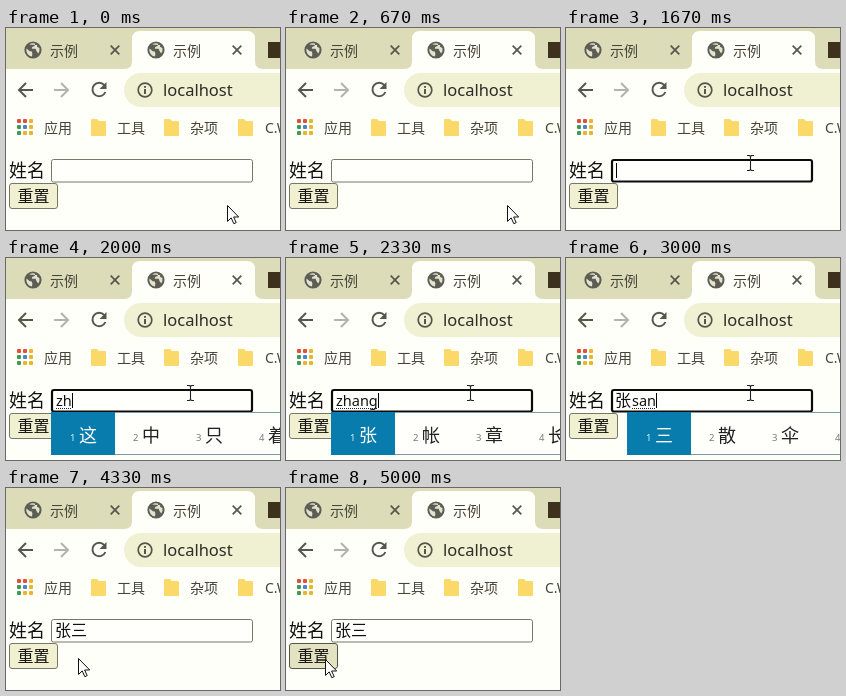
An HTML page that plays this animation: 274x202 px, repeating every 5330 ms.

```html
<!DOCTYPE html>
<html lang="zh-CN">
<head>
<meta charset="utf-8">
<title>示例</title>
<style>
html, body { margin: 0; width: 100%; height: 100%; overflow: hidden; background: #fffff9; }
svg { display: block; width: 274px; height: 202px; }
text { font-family: "Noto Sans CJK SC", "Noto Sans CJK", sans-serif; white-space: pre; }
.latin { font-family: "Noto Sans", "Open Sans", sans-serif; }
.ui { font-size: 14px; fill: #45453a; }
.line { fill: none; stroke: #55564c; stroke-width: 2; }
</style>
</head>
<body>
<svg viewBox="0 0 274 202">
  <defs>
    <g id="globe">
      <circle r="8.6" fill="#5c5e56"/>
      <path d="M-6.6-1.5L-3.2 1.2L-1.2 1.4L-.6 3.4L-1 6.6A6.8 6.8 0 0 1-6.6-1.5ZM-3.8-5.4A6.8 6.8 0 0 1 2.2-6.3L1.6-4L-.8-3L-1.2-1.2H2.6L3.6 1.2L5.2 3.6A6.8 6.8 0 0 0 6.4-2L4-3.2L4.2-5" fill="#e4e4cc"/>
    </g>
    <path id="close" class="line" d="M-4.3-4.3L4.3 4.3M4.3-4.3L-4.3 4.3" style="stroke-width:1.7"/>
    <path id="folder" d="M1 0H6L8 2H14Q15 2 15 3V16Q15 17 14 17H1Q0 17 0 16V1Q0 0 1 0Z" fill="#fbd969"/>
    <path id="back" class="line" d="M15 0H1.5M8-7L1 0L8 7"/>
  </defs>

  <rect width="274" height="202" fill="#fffff9"/>
  <rect width="274" height="41" fill="#dcdcb8"/>
  <path d="M118 41Q126 41 126 33V11Q126 3 134 3H241Q249 3 249 11V33Q249 41 257 41Z" fill="#fffff9"/>
  <use href="#globe" x="27" y="22"/>
  <use href="#globe" x="150" y="22"/>
  <text class="ui" x="44" y="27.5">示例</text>
  <text class="ui" x="167" y="27.5">示例</text>
  <use href="#close" x="109" y="22"/>
  <use href="#close" x="231" y="22"/>
  <rect x="262" y="14" width="16" height="16" fill="#3d301d"/>

  <use href="#back" x="12" y="62"/>
  <use href="#back" transform="translate(63 62) scale(-1 1)" opacity=".45"/>
  <path class="line" d="M98.3 57.2A6.7 6.7 0 1 0 99.4 64"/>
  <path d="M100.5 54V61H93.5Z" fill="#55564c"/>
  <rect x="118" y="45" width="190" height="34" rx="17" fill="#f0f0d3"/>
  <circle class="line" cx="139" cy="62" r="6.8" style="stroke-width:1.7"/>
  <path class="line" d="M139 61V66M139 58V59.8"/>
  <text class="latin" x="157" y="68" font-size="16.5" fill="#2c2c28">localhost</text>

  <g id="dots"></g>
  <text class="ui" x="38" y="105">应用</text>
  <use href="#folder" x="85" y="91"/>
  <text class="ui" x="111" y="105">工具</text>
  <use href="#folder" x="158" y="91"/>
  <text class="ui" x="184" y="105">杂项</text>
  <use href="#folder" x="232" y="91"/>
  <text class="ui latin" x="259" y="104.5">C.W</text>

  <text x="3" y="148.5" font-size="18" fill="#111">姓名</text>
  <rect id="field" fill="#fffffb"/>
  <text id="value" y="148" fill="#111"></text>
  <path id="under" stroke="#222" stroke-dasharray="1 1"/>
  <rect id="caret" y="135" width="1" height="15" fill="#000"/>
  <rect id="button" x="3.5" y="155.5" width="48" height="25" rx="2.5" stroke="#77776a"/>
  <text x="11.5" y="174" font-size="16" fill="#111">重置</text>

  <g id="popup">
    <rect x=".5" y="154.5" width="300" height="42" fill="#fffffb" stroke="#7f9aa2"/>
    <rect y="154" width="64" height="43" fill="#087cad"/>
    <g id="words"></g>
  </g>

  <path id="arrow" d="M.5.5V16.4L4.2 12.9L6.8 18.7L9.2 17.6L6.6 12H11.7Z" fill="#fff" stroke="#111"/>
  <path id="beam" d="M-3.5-7.5H-1L0-6.5L1-7.5H3.5M0-6.5V6.5M-3.5 7.5H-1L0 6.5L1 7.5H3.5" fill="none" stroke="#222" stroke-width="1.1"/>
</svg>
<script>
const LOOP = 5330;
const $ = id => document.getElementById(id);
const set = (el, attrs) => {
  for (const k in attrs) el.setAttribute(k, attrs[k]);
  return el;
};
const add = (parent, tag, attrs) =>
  parent.appendChild(set(document.createElementNS("http://www.w3.org/2000/svg", tag), attrs));
const show = (el, on) => { el.style.display = on ? "" : "none"; };

// Each step overrides the state reached so far.
const steps = [
  { at: 0, x: 221, y: 177, beam: false, focus: false, done: "", typing: "", list: "", hover: false },
  { at: 1000, x: 203, y: 165 },
  { at: 1330, x: 184.5, y: 135, beam: true },
  { at: 1670, focus: true },
  { at: 2000, typing: "zh", list: "这中只着" },
  { at: 2330, typing: "zhang", list: "张帐章长" },
  { at: 2670, done: "张", typing: "", list: "" },
  { at: 3000, typing: "san", list: "三散伞叁" },
  { at: 3330, done: "张三", typing: "", list: "" },
  { at: 3670, x: 110, y: 155, beam: false },
  { at: 4000, x: 76, y: 167, focus: false },
  { at: 4330, x: 72, y: 170 },
  { at: 4670, x: 39, y: 171, hover: true }
];

const dotColors = ["#e2503b", "#e2503b", "#e8b52c", "#3f9a58", "#4a83c9", "#e8b52c", "#3f9a58", "#e8b52c", "#e8b52c"];
dotColors.forEach((fill, i) =>
  add($("dots"), "rect", { x: 11 + i % 3 * 6, y: 91 + Math.floor(i / 3) * 6, width: 4, height: 4, rx: 1, fill }));

function drawList(list, left) {
  show($("popup"), list);
  if (!list) return;
  set($("popup"), { transform: `translate(${left} 0)` });
  $("words").replaceChildren();
  [...list].forEach((word, i) => {
    const x = 19 + i * 63;
    add($("words"), "text", { class: "latin", x, y: 183, "font-size": 9.5, fill: i ? "#777" : "#dceef4" }).textContent = i + 1;
    add($("words"), "text", { x: x + 9, y: 183.5, "font-size": 18, fill: i ? "#222" : "#fff" }).textContent = word;
  });
}

function drawValue(s) {
  const value = $("value"), start = 49 + s.done.length * 16;
  value.replaceChildren();
  add(value, "tspan", { x: 49, "font-size": 16 }).textContent = s.done;
  const typed = add(value, "tspan", { x: start + 1, class: "latin", "font-size": 14.5 });
  typed.textContent = s.typing;
  const end = s.typing ? start + 1 + typed.getComputedTextLength() : start;
  show($("under"), s.typing);
  set($("under"), { d: `M${start + 1} 150.5H${end}` });
  show($("caret"), s.focus);
  set($("caret"), { x: Math.round(end) + (s.typing ? 0 : 1) });
}

function draw(s) {
  set($("field"), s.focus
    ? { x: 46, y: 132, width: 200, height: 21.5, rx: 2, stroke: "#0b0b0b", "stroke-width": 2.2 }
    : { x: 45.5, y: 131.5, width: 201, height: 22.5, rx: 2, stroke: "#77776a", "stroke-width": 1 });
  drawValue(s);
  drawList(s.list, 45 + s.done.length * 16);
  set($("button"), { fill: s.hover ? "#e3e3c2" : "#f1f1d2", stroke: s.hover ? "#555549" : "#77776a" });
  show($("arrow"), !s.beam);
  show($("beam"), s.beam);
  set(s.beam ? $("beam") : $("arrow"), { transform: `translate(${s.x} ${s.y})` });
}

let last = -1;
function update(now) {
  const t = now % LOOP;
  const count = steps.filter(step => step.at <= t + 0.5).length;
  if (count !== last) {
    last = count;
    draw(Object.assign({}, ...steps.slice(0, count)));
  }
}

const begin = performance.now();
function tick() {
  update(performance.now() - begin);
  requestAnimationFrame(tick);
}
tick();
</script>
</body>
</html>
```
